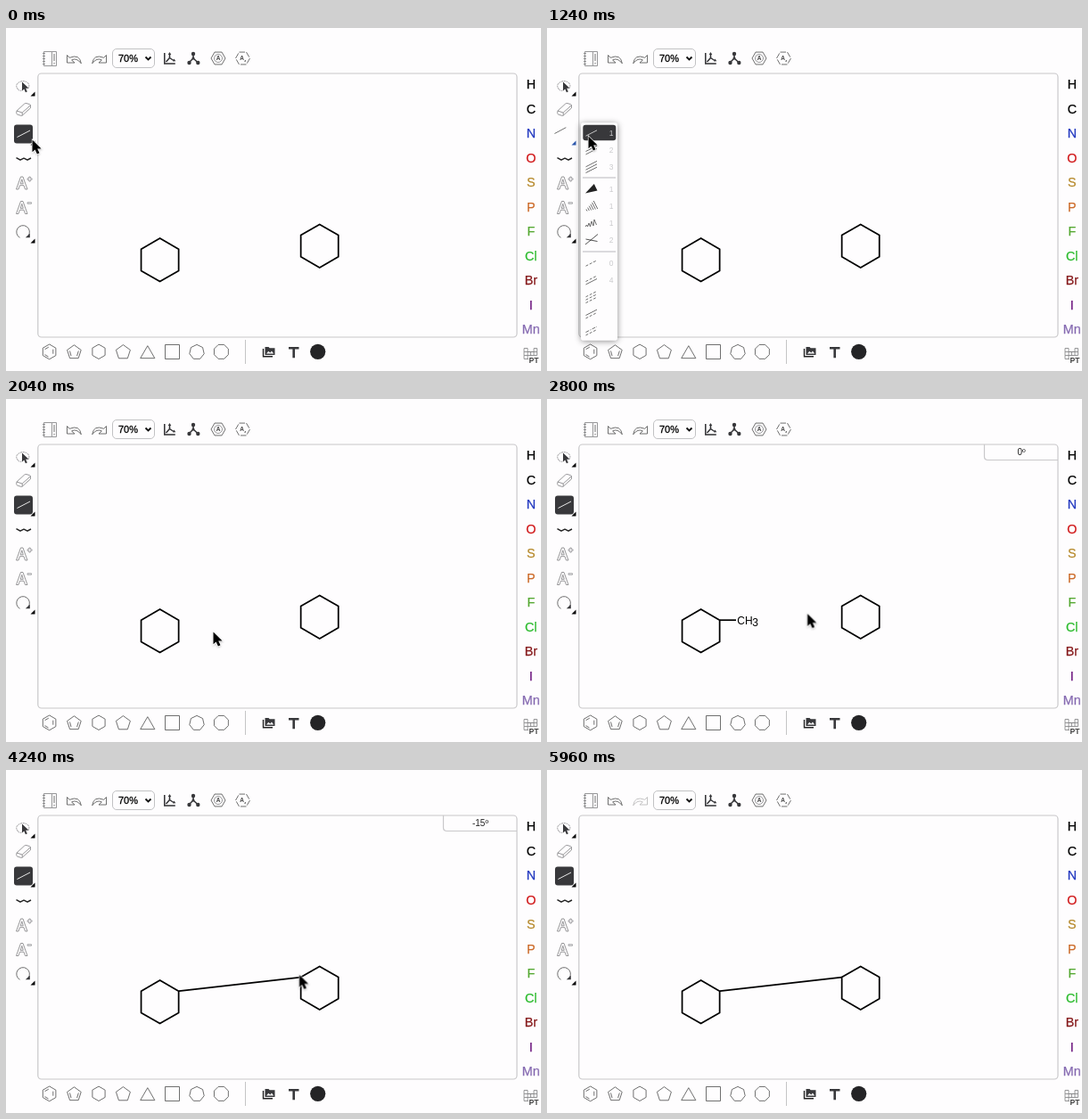
These frames come from a looping animation (600x385 px, 6880 ms). An HTML page:

```html
<!DOCTYPE html>
<html lang="en">
<head>
<meta charset="utf-8">
<title>Bond drawing</title>
<style>
html, body { margin: 0; width: 100%; height: 100%; overflow: hidden; background: #fefdfe; }
svg { display: block; width: 600px; height: 385px; font-family: "Liberation Sans", Arial, sans-serif; }
.thin { fill: none; stroke: #555; stroke-width: .85; stroke-linejoin: round; }
.pale { stroke: #858587; }
.bold { fill: none; stroke: #000; stroke-width: 1.75; stroke-linejoin: round; }
.dark { fill: #38383b; }
.mid { text-anchor: middle; }

/* One shared clock: 6880 ms per loop */
.t { animation: 6880ms linear infinite; }
.snap { animation-timing-function: step-end; }
#cursor { animation-name: move; }
#menu { animation-name: menu; }
#active { animation-name: active; }
#open { animation-name: open; }
#hover { animation-name: hover; }
#panel { animation-name: panel; }
.flat { animation-name: flat; }
#angle { animation-name: angle; }
#tilted { animation-name: tilted; }
#joined { animation-name: joined; }
#redo { animation-name: redo; }

@keyframes move {
  0%, 4.07% { transform: translate(29px, 125px); animation-timing-function: ease-out; }
  7.56%, 12% { transform: translate(28px, 130px); animation-timing-function: ease-in-out; }
  18.02%, 21.51% { transform: translate(46px, 121px); animation-timing-function: ease-in-out; }
  29.65%, 32.56% { transform: translate(232px, 261px); animation-timing-function: ease-in-out; }
  36.05%, 37.79% { transform: translate(194px, 247px); animation-timing-function: ease-in-out; }
  42.44%, 43.02% { transform: translate(331px, 238px); animation-timing-function: ease-out; }
  48.26%, 51.74% { transform: translate(342px, 231.5px); }
  52.33%, 54.65% { transform: translate(341px, 232px); animation-timing-function: ease-in-out; }
  58.14%, 69.19% { transform: translate(328.5px, 229.5px); animation-timing-function: ease-in-out; }
  75%, 77.33% { transform: translate(394px, 135.5px); animation-timing-function: ease-in; }
  86.63%, 100% { transform: translate(430px, 388px); }
}
@keyframes menu {
  0%, 11.05% { opacity: 0; }
  13.37%, 21.51% { opacity: 1; }
  23.84%, 100% { opacity: 0; }
}
@keyframes active { 0% { opacity: 1; } 11.05% { opacity: 0; } 21.51%, 100% { opacity: 1; } }
@keyframes open { 0% { opacity: 0; } 11.05% { opacity: 1; } 21.51%, 100% { opacity: 0; } }
@keyframes hover { 0% { opacity: 0; } 35.47% { opacity: 1; } 37.79%, 100% { opacity: 0; } }
@keyframes panel { 0% { opacity: 0; } 37.79% { opacity: 1; } 69.77%, 100% { opacity: 0; } }
@keyframes flat { 0% { opacity: 0; } 37.79% { opacity: 1; } 56.4%, 100% { opacity: 0; } }
@keyframes angle { 0% { opacity: 0; } 56.4% { opacity: 1; } 69.77%, 100% { opacity: 0; } }
@keyframes tilted { 0% { opacity: 0; } 56.4% { opacity: 1; } 61.05%, 100% { opacity: 0; } }
@keyframes joined { 0% { opacity: 0; } 61.05%, 100% { opacity: 1; } }
@keyframes redo { 0% { opacity: 1; } 69.77%, 100% { opacity: .4; } }
</style>
</head>
<body>
<svg viewBox="0 0 600 385">
  <defs>
    <path id="turn" d="M68.500 30.500v8.500h8.500l-3.400-3q5.500-3.200 10.700 3.800q-1.500-11-13-6.500z"/>
    <path id="corner" d="M32.500 0v5h-5z"/>
    <path id="bigA" d="M11.500 181l5-14h2.500l5 14h-2.500l-1.500-4.300h-4.500l-1.500 4.300zM16.200 174.800h3.100l-1.500-4.900z"/>
    <filter id="shade" x="-50%" y="-10%" width="200%" height="120%">
      <feDropShadow dx="0" dy="1" stdDeviation="3.500" flood-color="#000" flood-opacity=".45"/>
    </filter>
    <filter id="soft" x="-50%" y="-50%" width="200%" height="200%">
      <feDropShadow dx="0" dy="1" stdDeviation="1" flood-color="#000" flood-opacity=".25"/>
    </filter>
  </defs>

  <rect x="35.800" y="51" width="537.200" height="296" rx="4" fill="none" stroke="#c9c8ca" stroke-width="1.200"/>

  <!-- Top bar -->
  <g class="thin">
    <g class="pale">
      <path d="M42.500 26.500h9v16h-9zM51.500 26.500h5v16h-5" />
      <path d="M41 28.500h3M41 31.500h3M41 34.500h3M41 37.500h3M41 40.500h3"/>
    </g>
    <path d="M54 29v8M54 38.800v1.700"/>
    <use href="#turn"/>
    <g id="redo" class="t snap"><use href="#turn" transform="matrix(-1 0 0 1 181 0)"/></g>
    <rect x="119.500" y="23.500" width="47" height="21" rx="4.500" stroke="#b8b8ba"/>
  </g>
  <text x="126" y="38" font-size="11" stroke="#000" stroke-width=".3">70%</text>
  <path d="M156.500 32.500l3 3 3-3" fill="none" stroke="#111" stroke-width="1.800"/>
  <path d="M177.800 28v12h12M179.500 38l4-4.500M183.500 33.500l4.500 3M183.500 33.500v-4" fill="none" stroke="#303033" stroke-width="1.500"/>
  <path d="M181.700 30l1.800-3 1.800 3zM187 37.500l3.300-.300-1.800-2.700z" class="dark"/>
  <path d="M210 29v5l-5 5M210 34l5.500 5" fill="none" stroke="#303033" stroke-width="1.500"/>
  <g class="dark">
    <circle cx="210" cy="29" r="2.200"/><circle cx="210" cy="34" r="1.500"/>
    <circle cx="205.500" cy="39" r="2.200"/><circle cx="215.300" cy="39" r="2.200"/>
  </g>
  <circle cx="238" cy="34" r="4.500" class="thin pale"/>
  <g class="mid" font-weight="bold" font-size="6.500" fill="#444">
    <text x="238" y="36.300">A</text><text x="264.500" y="36.300">A</text>
    <text x="268.300" y="37.500" font-size="4">z</text>
  </g>

  <!-- Left bar -->
  <path d="M13.500 69q-4-5 1-8t10 .500q3 4-.500 7M13.500 69q2 2 4 1" class="thin pale" stroke-dasharray="2 .8"/>
  <path d="M18 60.500v10l2.300-2 1.600 3.800 1.900-.900-1.600-3.700 3.200-.200z" class="dark"/>
  <path d="M12 93l8.500-7.800q1-1 2.500-.600l3.500 1q1 .4 1 1.500v2.700l-9.300 8.400q-.7.500-1.500.200l-4.200-1.500q-.8-.4-.8-1.300zM12 93l6.200 2 9.300-8.300M18.200 95v3.200" class="thin pale"/>
  <path d="M11.500 145.700l4.500 2.500 4-2 4 2 4-2.200" fill="none" stroke="#222" stroke-width="1.500" stroke-linejoin="round"/>
  <g class="thin pale">
    <use href="#bigA"/><use href="#bigA" y="27.500"/>
    <path d="M24 168.800h1.800v-1.800h1.500v1.800h1.800v1.500h-1.800v1.800h-1.500v-1.800h-1.800zM24 195.800h4.500v1.400H24z" stroke-width=".7"/>
  </g>
  <path d="M15.500 235.300a7.300 7.300 0 1 1 9.300-1.800" class="thin"/>
  <path d="M21.800 235.300h5v-4.500z" class="dark"/>
  <use href="#corner" y="71.500"/><use href="#corner" y="236.500"/>
  <g id="active" class="t snap">
    <rect x="9" y="108.500" width="21" height="21" rx="3" class="dark"/>
    <path d="M12.500 122.500l14.500-7.500" stroke="#e8e8e8"/>
    <use href="#corner" y="126.500"/>
  </g>
  <g id="open" class="t snap">
    <path d="M8.500 118.500l12.800-6.800" class="thin"/>
    <use href="#corner" y="126.500" fill="#2c58ad"/>
  </g>

  <!-- Bottom bar and elements -->
  <g id="rings" class="thin">
    <path d="M52.800 360.700v5M47.500 369l-4-2.400M43.500 360.700l4.300-2.500"/>
    <path d="M71.500 362.500l1.500 5.500M81.300 362.500l-1.700 5.500"/>
    <rect x="178.500" y="355.500" width="16" height="16"/>
  </g>
  <path d="M268.500 350v27" stroke="#c4c4c6"/>
  <path d="M288.500 360v8.800h10.500" fill="none" stroke="#222" stroke-width="1.400"/>
  <path d="M290.500 358h4l1.200 1.300h5.800v7.700h-11z" class="dark"/>
  <path d="M292 365.500l2.300-2.800 2 1.800 1.600-2 2.300 3z" fill="#fff"/>
  <path d="M317 358h11.500v2.500h-4.500v9.700h-2.600v-9.700H317z" class="dark"/>
  <circle cx="349.700" cy="363.300" r="8.600" fill="#242426"/>
  <path d="M581 359.500h4v4h7v-4h3.500v8H581zM581 363.500h14.500M581 367.500v4h5M585 363.500v8M588.500 363.500v4M592 363.500v4" class="thin pale"/>
  <text x="586.500" y="375.500" font-size="8.500" font-weight="bold" fill="#444">PT</text>
  <g id="elements" class="mid" font-size="14.300" stroke-width=".25"></g>

  <!-- Drawing -->
  <g id="molecules" class="bold"></g>
  <circle id="hover" class="t snap" cx="194" cy="248.200" r="9.800" fill="none" stroke="#885110" stroke-width="1.200"/>
  <g class="t snap flat" id="level"></g>
  <g class="t snap" id="tilted"></g>
  <path class="t snap bold" id="joined" d="M194 248.200L330.800 232.700"/>
  <path id="panel" class="t snap" d="M490.500 51v13.500q0 4 4 4H573" fill="none" stroke="#c9c8ca" stroke-width="1.200"/>
  <g class="mid" font-size="10" fill="#222">
    <text class="t snap flat" x="532" y="62.500">0º</text>
    <text class="t snap" id="angle" x="532" y="62.500">-15º</text>
  </g>

  <g id="menu" class="t">
    <rect x="38" y="106.500" width="41" height="244" rx="3" fill="#fefdfe" filter="url(#shade)"/>
    <rect x="40.300" y="108.800" width="37" height="17.400" rx="3" class="dark"/>
    <path d="M40 168h37M40 251h37" stroke="#d0d0d2" stroke-width="1.600"/>
    <g id="bonds" class="thin"></g>
    <g id="counts" class="mid" font-size="8.500" fill="#cacacc"></g>
  </g>

  <path id="cursor" class="t" d="M.5.5v13.800l3.100-2.900 2.300 5 2.600-1.200-2.300-4.800h4.400z" stroke="#fff" stroke-width="1.200" paint-order="stroke" filter="url(#soft)"/>
</svg>

<script>
const get = id => document.getElementById(id);

function add(parent, tag, attrs, text = "") {
  const el = document.createElementNS("http://www.w3.org/2000/svg", tag);
  for (const key in attrs) el.setAttribute(key, attrs[key]);
  el.textContent = text;
  return get(parent).appendChild(el);
}

// Regular polygon, first corner on top unless turned
function ring(parent, x, y, r, n, turn = 0, dash = "none") {
  const points = Array.from({ length: n }, (_, i) => {
    const a = 2 * Math.PI * (i + turn) / n - Math.PI / 2;
    return [x + r * Math.cos(a), y + r * Math.sin(a)];
  });
  add(parent, "polygon", { points: points.join(" "), "stroke-dasharray": dash });
}

ring("molecules", 172.6, 260.3, 24.3, 6);
ring("molecules", 351.7, 244.7, 24.3, 6);
ring("rings", 238, 34, 8, 6, .5);
ring("rings", 265.5, 34, 8, 6, .5, "6.5 1.5");
ring("rings", 48.6, 363.4, 8.4, 6);
ring("rings", 76.4, 364, 8.2, 5);
ring("rings", 104, 363.3, 8.2, 6);
ring("rings", 131.4, 364, 8.4, 5);
ring("rings", 158.8, 366, 9.3, 3);
ring("rings", 214, 363.8, 8.4, 7);
ring("rings", 241.4, 363.4, 8.6, 8, .5);

const elements = { H: "#000", C: "#000", N: "#2238c0", O: "#d0181a", S: "#b5882a", P: "#cc6a28",
  F: "#55a832", Cl: "#2dbb2f", Br: "#85181a", I: "#6c147e", Mn: "#8468b0" };
Object.entries(elements).forEach(([name, fill], i) =>
  add("elements", "text", { x: 588.8, y: 68.2 + 27.5 * i, fill, stroke: fill }, name));

function methyl(parent, degrees) {
  const a = degrees * Math.PI / 180;
  const at = d => [194 + d * Math.cos(a), 248.2 + d * Math.sin(a)];
  const [x, y] = at(24.3);
  add(parent, "path", { d: `M194 248.2L${at(18)}`, class: "bold" });
  add(parent, "text", { x: x - 5, y: y + 4.6, "font-size": 12 }, "CH");
  add(parent, "text", { x: x + 12, y: y + 6.8, "font-size": 12 }, "3");
}
methyl("level", 0);
methyl("tilted", -15);

// Parallel strokes around a menu row's middle; each dash pattern is one stroke
function strokes(y, ...dashes) {
  dashes.forEach((dash, i) => {
    const s = y + (i - (dashes.length - 1) / 2) * 3.4;
    add("bonds", "path", { d: `M43.5 ${s + 3.2}L56 ${s - 3.2}`, "stroke-dasharray": dash,
      stroke: y < 120 ? "#ddd" : "#555" });
  });
}
const solid = "none", dashed = "3 1.8", dotted = "4 1.5 1 1.5";
strokes(118, solid);
strokes(137, solid, solid);
strokes(156, solid, solid, solid);
add("bonds", "path", { d: "M43 185.500L52.800 175L56.500 182.500z", fill: "#222", stroke: "none" });
for (let i = 0; i < 6; i++) {
  const x = 44.5 + i * 2, y = 204.5 - i * 1.2, w = 1 + i * .7;
  add("bonds", "path", { d: `M${x - w * .5} ${y - w}L${x + w * .5} ${y + w}` });
}
add("bonds", "path", { d: "M43 223l1.500-2 1 2 1.500-4 1.500 4 1.500-6 2 5 1-7 2.500 6" });
add("bonds", "path", { d: "M43 243L57 231.500M43.500 237L56.500 239.500", stroke: "#333" });
strokes(264, dashed);
strokes(283, dashed, solid);
strokes(302, dashed, dashed, dashed);
strokes(321, solid, dashed);
strokes(340, dotted, dashed);

[[118, 1], [137, 2], [156, 3], [181, 1], [200, 1], [219, 1], [238, 2], [264, 0], [283, 4]]
  .forEach(([y, n]) => add("counts", "text", { x: 72, y: y + 3 }, n));
</script>
</body>
</html>
```
